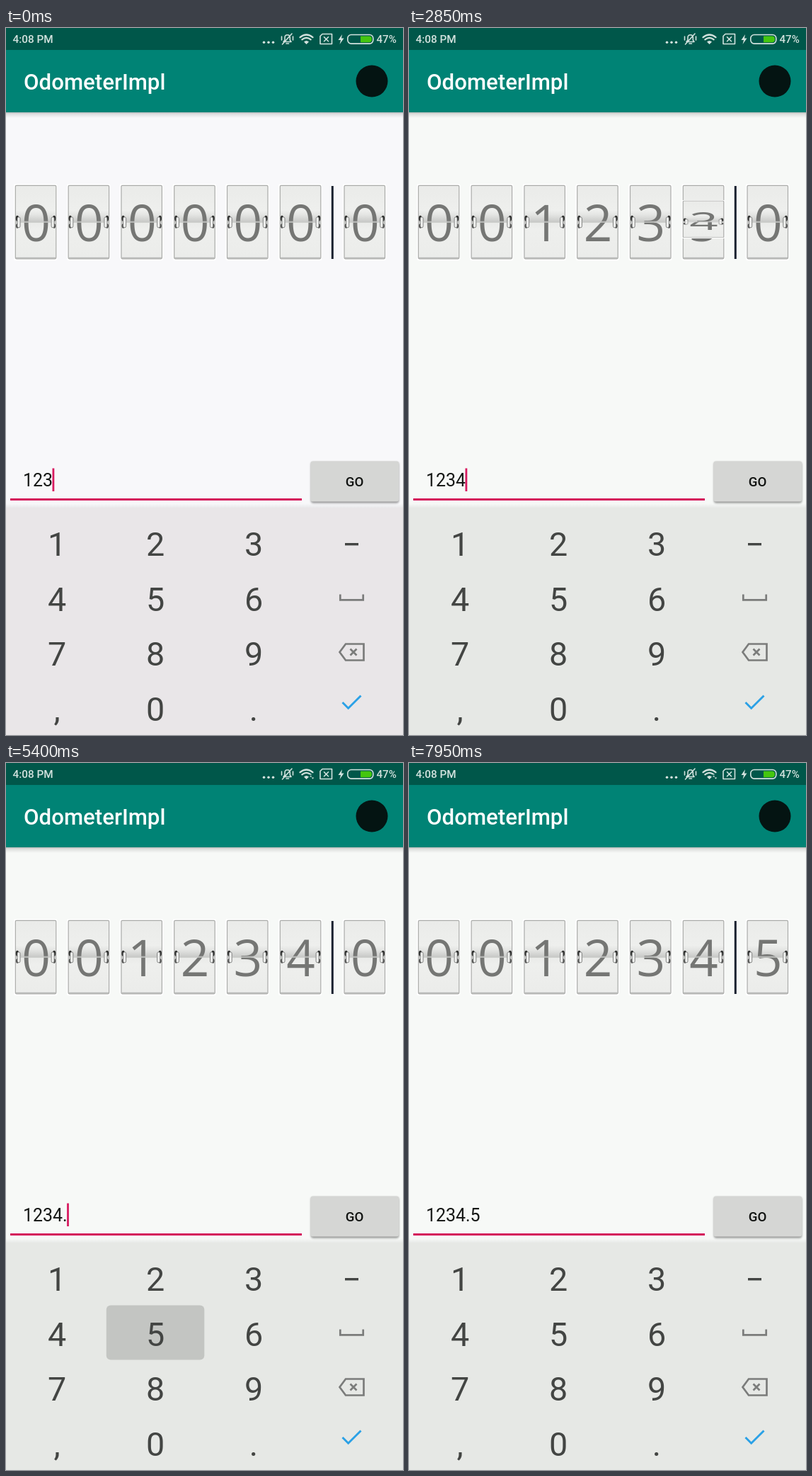
These frames come from a looping animation (561 by 998 pixels, 8 s). An HTML page:

```html
<!DOCTYPE html>
<html lang="en">
<head>
<meta charset="utf-8">
<title>Odometer</title>
<style>
  html, body { margin: 0; width: 100%; height: 100%; overflow: hidden; }
  svg { display: block; width: 100vw; height: 100vh; }
  text { font-family: Roboto, "Noto Sans", sans-serif; white-space: pre; }
  .medium { font-weight: 500; }
  .key { font-size: 46.7px; fill: #434543; text-anchor: middle; }
  .digit { font: 71px "Open Sans", "Noto Sans", sans-serif; fill: #757674; text-anchor: middle; }
  .line { fill: none; stroke: #d3e2de; stroke-width: 1.6; stroke-linecap: round; stroke-linejoin: round; }
  .icon { fill: none; stroke: #7b7c7b; stroke-width: 2.7; }
</style>
</head>
<body>
<svg viewBox="0 0 561 998" preserveAspectRatio="none">
  <defs>
    <linearGradient id="drop" x2="0" y2="1">
      <stop offset="0" stop-opacity=".3"/><stop offset=".4" stop-opacity=".1"/><stop offset="1" stop-opacity="0"/>
    </linearGradient>
    <linearGradient id="edge" x2="0" y2="1">
      <stop offset="0" stop-opacity="0"/><stop offset="1" stop-opacity=".06"/>
    </linearGradient>
    <linearGradient id="paper" x2="0" y2="1">
      <stop offset="0" stop-color="#eaebe9"/><stop offset=".34" stop-color="#eeefed"/>
      <stop offset=".4" stop-color="#e4e5e3"/><stop offset=".495" stop-color="#c9cac8"/>
      <stop offset=".5" stop-color="#e9eae8"/><stop offset=".6" stop-color="#eeefed"/>
      <stop offset="1" stop-color="#ebecea"/>
    </linearGradient>
    <clipPath id="upper"><rect x="-4" y="-56" width="66" height="56"/></clipPath>
    <clipPath id="lower"><rect x="-4" y="0" width="66" height="57"/></clipPath>
    <clipPath id="buttonClip"><rect x="430.5" y="611.5" width="124.5" height="57" rx="3"/></clipPath>
    <filter id="soft" x="-20%" y="-20%" width="140%" height="150%"><feGaussianBlur stdDeviation="1.6"/></filter>
    <g id="hinge">
      <ellipse cx="3.2" cy="-5" rx="2.2" ry="4" fill="#2c2d2c"/>
      <ellipse cx="3.2" cy="5.5" rx="2" ry="3.4" fill="#4c4d4c"/>
      <rect x="3.2" y="-7" width="4" height="15" rx="2" fill="#f1f2f0" stroke="#777877" stroke-width=".9"/>
    </g>
    <g id="face">
      <rect x="-1.5" y="-53.5" width="61" height="108" rx="2" fill="#fff"/>
      <rect x=".5" y="-51.5" width="57.5" height="103.5" rx="1.5" fill="url(#paper)" stroke="#a9aaa8" stroke-width="1.2"/>
      <path d="M1 50.6H57.5" stroke="#b7b8b6" stroke-width="1.4"/>
    </g>
    <g id="fittings">
      <path d="M1 0H57.5" stroke="#c6c7c5" stroke-width="2"/>
      <use href="#hinge"/>
      <use href="#hinge" transform="matrix(-1 0 0 1 58.5 0)"/>
    </g>
  </defs>

  <rect id="page" width="561" height="998"/>

  <rect y="118" width="561" height="9" fill="url(#drop)"/>
  <rect width="561" height="119" fill="#008375"/>
  <rect width="561" height="31" fill="#00574a"/>
  <text class="medium" x="25" y="87" font-size="31.2" fill="#fff">OdometerImpl</text>
  <circle cx="517" cy="75" r="22.5" fill="#041412"/>

  <g fill="#d3e2de">
    <text class="medium" x="9.5" y="21" font-size="15.3">4:08 PM</text>
    <text class="medium" x="523.5" y="21" font-size="15.1">47%</text>
    <circle cx="364.5" cy="20.3" r="1.8"/><circle cx="371" cy="20.3" r="1.8"/><circle cx="377.5" cy="20.3" r="1.8"/>
    <path d="M475 9L469.5 17H473L471.5 23L477.5 14.5H474Z"/>
    <path d="M421 19.5Q424.5 16.5 428 19.5L424.5 23Z"/>
  </g>
  <g class="line">
    <path d="M392 19.5H403L401.3 17V13.5C401.3 8.5 394 8.5 394 13.5V17ZM396 22H399.5M404 8L390.5 23M389.5 12V17M405.5 12V17"/>
    <path d="M415.5 13.2Q424.5 5.8 433.5 13.2M418.3 16.4Q424.5 11.2 430.7 16.4" stroke-width="2.2"/>
    <path d="M447 8.5H460.5V22.5H444V11.5ZM449.5 12.7L455.5 18.7M455.5 12.7L449.5 18.7"/>
    <rect x="482.8" y="9.5" width="36" height="12.6" rx="5"/>
  </g>
  <path d="M501 11.4H513Q517 11.4 517 15.8T513 20.2H501Z" fill="#45c60f"/>
  <g id="traffic">
    <rect x="428.5" y="16.5" width="7" height="7" fill="#00574a"/>
    <path d="M429 19.6L430.7 17.4L432.4 19.6ZM431.8 20.6H435.2L433.5 22.8Z" fill="#d3e2de"/>
  </g>

  <g id="cards"></g>
  <rect x="459.8" y="223" width="3" height="103" fill="#1b2230"/>

  <text id="entry" x="24" y="647" font-size="24.93" fill="#161816"></text>
  <rect id="caret" y="621.5" width="2.8" height="32.5" fill="#d81b60"/>
  <rect x="6" y="664" width="412" height="3" fill="#d4145a"/>

  <rect x="431" y="613" width="124" height="57.5" rx="3" opacity=".42" filter="url(#soft)"/>
  <g clip-path="url(#buttonClip)">
    <rect x="430" y="611" width="126" height="58" fill="#d5d6d4"/>
    <circle id="ripple" cx="492.5" cy="655" fill="#bfc0be"/>
  </g>
  <text class="medium" x="492.5" y="646.7" font-size="18.7" fill="#111311" text-anchor="middle">GO</text>

  <rect y="671" width="561" height="6" fill="url(#edge)"/>
  <rect id="pad" y="677" width="561" height="321"/>
  <rect id="press" width="138.5" rx="6" fill="#c3c5c2"/>
  <g id="keys"></g>
  <path d="M479 728.7H498" stroke="#434543" stroke-width="3.4"/>
  <path class="icon" d="M472.3 799.5V807.3H504.7V799.5"/>
  <path class="icon" d="M480 869.5H505.5V892.5H480L471.5 881ZM486.5 876.5L495.5 885.5M495.5 876.5L486.5 885.5" stroke-width="2.3"/>
  <path class="icon" d="M475.5 952L483.7 960.3L501.5 942.5" style="stroke:#2ba1e6;stroke-width:2.9"/>
</svg>
<script>
const LOOP = 8000, FLIP = 250, FIRST_GO = 1995, SECOND_GO = 6262;
const NS = "http://www.w3.org/2000/svg";
const $ = id => document.getElementById(id);

function add(parent, tag, attrs = {}) {
  const el = document.createElementNS(NS, tag);
  for (const name in attrs) el.setAttribute(name, attrs[name]);
  return parent.appendChild(el);
}

function set(el, attrs) {
  for (const name in attrs) el.setAttribute(name, attrs[name]);
}

// One half of a card: a clipped face that can be squashed towards the hinge.
function makeHalf(card, side) {
  const g = add(card, "g");
  const clip = add(g, "g", { "clip-path": `url(#${side})` });
  add(clip, "use", { href: "#face" });
  const label = add(clip, "text", { class: "digit", x: 29.8, y: 27 });
  add(clip, "use", { href: "#fittings" });
  return (digit, scale = 1) => {
    label.textContent = digit;
    g.setAttribute("transform", `scale(1 ${scale})`);
    g.style.display = scale > 0.002 ? "" : "none";
  };
}

function makeCard(x, target, start) {
  const g = add($("cards"), "g", { transform: `translate(${x} 273.8)` });
  const backTop = makeHalf(g, "upper"), backBottom = makeHalf(g, "lower");
  const flapTop = makeHalf(g, "upper"), flapBottom = makeHalf(g, "lower");
  return t => {
    const turn = Math.min(target, Math.max(0, (t - start) / FLIP));
    const from = Math.floor(turn), p = turn - from;
    const to = Math.min(target, from + 1);
    backTop(to);
    backBottom(from);
    flapTop(from, 1 - p);
    flapBottom(to, p);
  };
}

const cards = [0, 0, 1, 2, 3, 4].map((n, i) => makeCard(12.8 + i * 74.8, n, FIRST_GO));
cards.push(makeCard(477.5, 5, SECOND_GO));

["123", "456", "789", ",0."].forEach((row, r) =>
  [...row].forEach((label, c) => {
    add($("keys"), "text", { class: "key", x: 72 + c * 139, y: 745.3 + r * 77.4 }).textContent = label;
  }));

const presses = [
  { from: 750, to: 1050, col: 0, row: 1 },
  { from: 4800, to: 4950, col: 2, row: 3 },
  { from: 5400, to: 5700, col: 1, row: 1 }
];
const entries = [[0, "123"], [1050, "1234"], [4950, "1234."], [5700, "1234.5"]];
// Times at which each flag flips over.
const caretFlips = [600, 1050, 1650, 2250, 3450, 4050, 4650, 4950, 5550, 5700, 6300, 6900, 7500];
const trafficFlips = [1650, 2700, 3900];

const flipped = (times, t) => times.filter(time => time <= t).length % 2 === 1;
const show = (el, on) => { el.style.display = on ? "" : "none"; };
const mix = (a, b, k) => `rgb(${a.map((v, i) => Math.round(v + (b[i] - v) * k))})`;
const clamp = v => Math.min(1, Math.max(0, v));

function drawRipple(t) {
  const go = t < 5000 ? FIRST_GO : SECOND_GO;
  const age = t - go + 100;
  set($("ripple"), {
    r: Math.min(90, Math.max(0, age / 3)),
    opacity: 1 - clamp((age - 350) / 470)
  });
}

function drawEntry(t) {
  const text = entries.filter(e => e[0] <= t).pop()[1];
  const dots = text.includes(".") ? 1 : 0;
  $("entry").textContent = text;
  $("caret").setAttribute("x", 23.5 + 14 * (text.length - dots) + 6.6 * dots);
  show($("caret"), !flipped(caretFlips, t));
}

function drawPress(t) {
  const key = presses.find(p => t >= p.from && t < p.to);
  show($("press"), key);
  if (key) set($("press"), {
    x: 2.8 + key.col * 139,
    y: 688 + key.row * 77.4,
    height: key.row === 3 ? 78 : 77
  });
}

function render(t) {
  const tone = clamp((t - 600) / 1500);
  $("page").setAttribute("fill", mix([248, 248, 250], [247, 249, 247], tone));
  $("pad").setAttribute("fill", mix([233, 230, 232], [230, 232, 229], tone));
  cards.forEach(draw => draw(t));
  drawEntry(t);
  drawPress(t);
  drawRipple(t);
  show($("traffic"), flipped(trafficFlips, t));
}

const begin = performance.now();
function tick() {
  render((performance.now() - begin) % LOOP);
  requestAnimationFrame(tick);
}
tick();
</script>
</body>
</html>
```
